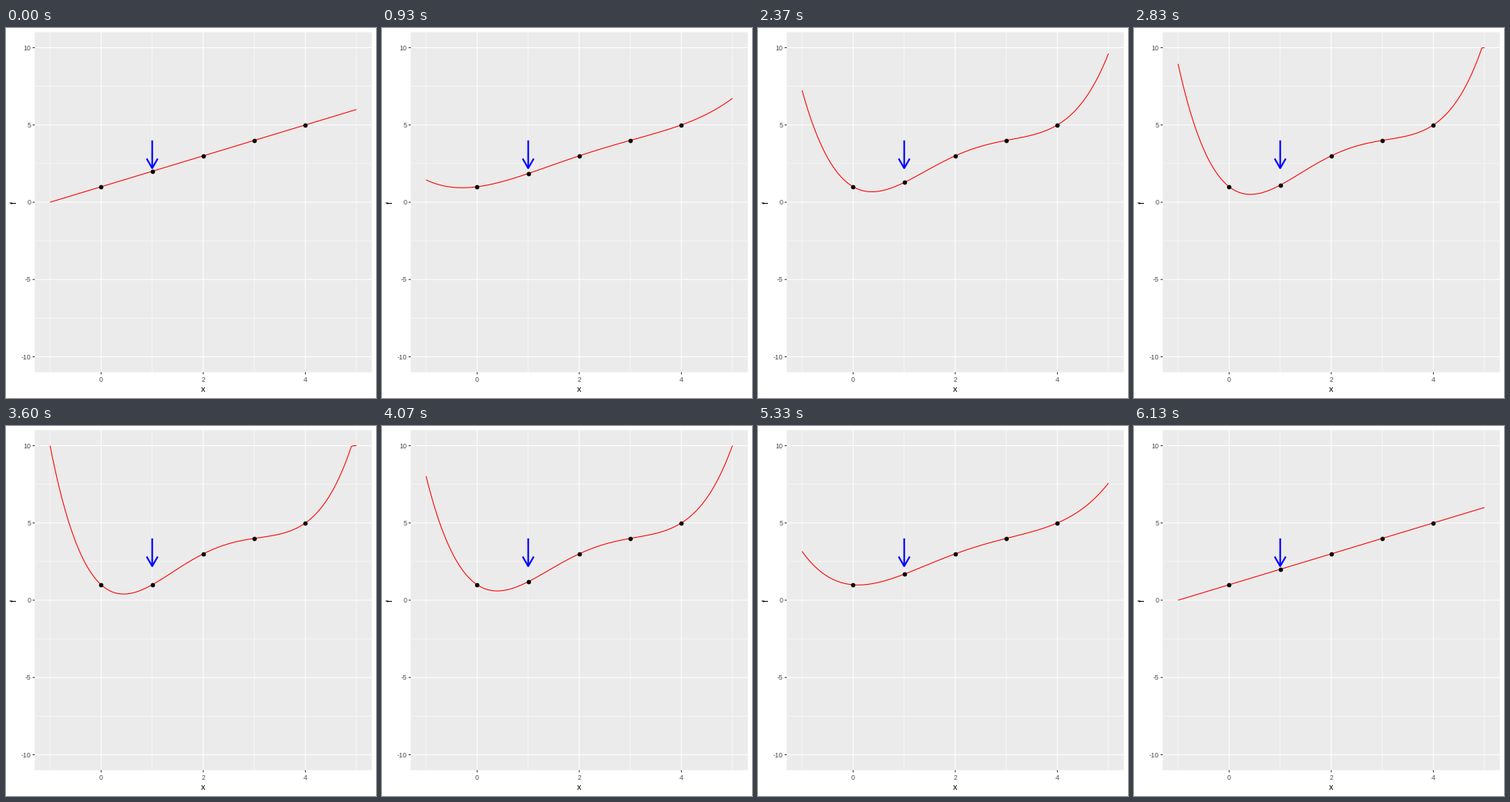
Animation of 480x480 px, one loop 6.67 s. Source, as a matplotlib script:

```python
import numpy as np
import matplotlib.pyplot as plt
from matplotlib.animation import FuncAnimation
from matplotlib.patches import Rectangle

plt.rcParams["font.family"] = "Liberation Sans"
plt.rcParams["path.snap"] = False

SIZE, FRAMES, LOOP_MS = 480, 200, 6670
LEFT, RIGHT, TOP, BOTTOM = 37.3, 474.52, 5.48, 446.5
UP_START, DOWN_START, MOVE = 16, 107, 76  # in frames
THIN, NORMAL, THICK = 0.53, 1.07, 2.13


def px(x):
    return LEFT + (np.asarray(x) + 1.3) / 6.6 * (RIGHT - LEFT)


def py(y):
    return TOP + (11 - np.asarray(y)) / 22 * (BOTTOM - TOP)


def curve(x, drop):
    """Quartic through (0,1), (1,2-drop), (2,3), (3,4), (4,5), capped at 10."""
    return np.minimum(x + 1 + drop * x * (x - 2) * (x - 3) * (x - 4) / 6, 10)


def drop_at(frame):
    up = np.clip((frame - UP_START) / MOVE, 0, 1)
    down = np.clip((frame - DOWN_START) / MOVE, 0, 1)
    return up - down


fig = plt.figure(figsize=(SIZE / 72, SIZE / 72), dpi=72, facecolor="white")
ax = fig.add_axes([0, 0, 1, 1])
ax.set(xlim=(0, SIZE), ylim=(SIZE, 0))
ax.axis("off")


def stroke(xs, ys, color, width, z, **kw):
    return ax.plot(xs, ys, color=color, lw=width, zorder=z,
                   solid_capstyle="butt", **kw)[0]


def grid(xs, ys, width, z):
    for x in px(xs):
        stroke([x, x], [TOP, BOTTOM], "white", width, z)
    for y in py(ys):
        stroke([LEFT, RIGHT], [y, y], "white", width, z)


ax.add_patch(Rectangle((LEFT, TOP), RIGHT - LEFT, BOTTOM - TOP,
                       fc="#ebebeb", ec="none", zorder=0))
grid([-1, 1, 3, 5], [-7.5, -2.5, 2.5, 7.5], THIN, 1)
grid([0, 2, 4], [-10, -5, 0, 5, 10], NORMAL, 2)

# Axis ticks, labels and titles
label = dict(color="#4d4d4d", fontsize=8.8, va="baseline")
for v in (0, 2, 4):
    stroke([px(v)] * 2, [BOTTOM, BOTTOM + 2.74], "#333333", NORMAL, 3)
    ax.text(px(v), 458.8, str(v), ha="center", **label)
for v in (-10, -5, 0, 5, 10):
    stroke([LEFT - 2.74, LEFT], [py(v)] * 2, "#333333", NORMAL, 3)
    ax.text(32.4, py(v) + 3.15, str(v), ha="right", **label)
ax.text((LEFT + RIGHT) / 2, 471.6, "x", fontsize=11, ha="center", va="baseline")
ax.text(13.4, (TOP + BOTTOM) / 2, "f", fontsize=11, rotation=90,
        ha="center", va="baseline", rotation_mode="anchor")

xs = np.linspace(-1, 5, 121)
nodes = np.arange(5)
line = stroke(px(xs), py(curve(xs, 0)), "red", NORMAL, 4)
dots, = ax.plot(px(nodes), py(curve(nodes, 0)), "o", color="black",
                ms=5.7, mew=0, zorder=5)

# Arrow pointing at the moving node
tip_x, tip_y = px(1), py(2.2)
half, rise = 14.4 * np.sin(np.pi / 6), 14.4 * np.cos(np.pi / 6)
stroke([tip_x, tip_x], [py(4), tip_y], "blue", THICK, 6)
stroke([tip_x - half, tip_x, tip_x + half],
       [tip_y - rise, tip_y, tip_y - rise], "blue", THICK, 6,
       solid_joinstyle="round")


def update(frame):
    drop = drop_at(frame)
    line.set_ydata(py(curve(xs, drop)))
    dots.set_ydata(py(curve(nodes, drop)))
    return line, dots


anim = FuncAnimation(fig, update, frames=FRAMES, interval=LOOP_MS / FRAMES,
                     repeat=True, repeat_delay=0, blit=False)
plt.show()
```
